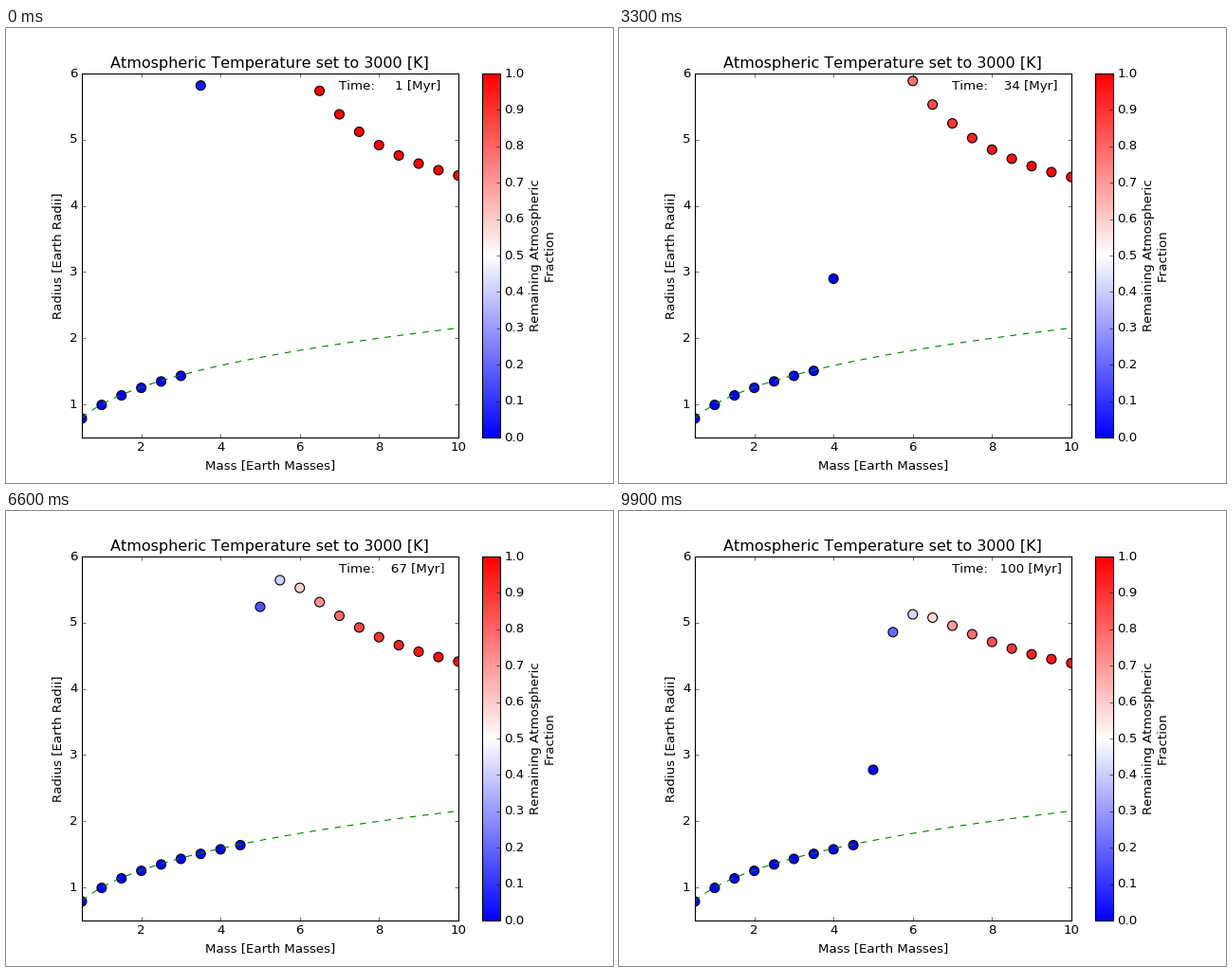
A matplotlib script for the animation above (10 s loop, 640x480 px).

```python
import math

import numpy as np
import matplotlib.pyplot as plt
from matplotlib.animation import FuncAnimation

plt.style.use("classic")
plt.rcParams.update({
    "font.family": "DejaVu Sans",
    "text.kerning_factor": 6,
    "figure.dpi": 80,
    "savefig.dpi": "figure",
    "figure.facecolor": "white",
})

FRAMES, INTERVAL = 100, 100

masses = np.arange(0.5, 10.01, 0.5)
core = 0.9925 * np.cbrt(masses)

# Depth of an untouched atmosphere: heavier planets hold it tighter
full = 0.874 + 9.742 / (masses - 3.269)

# Light planets have already lost part, or all, of it at the start
kept = np.array([math.erf(max(0, 0.089 + 0.75 * (m - 3.5))) for m in masses])
start = full * kept

# Time until the atmosphere is gone
life = 2.928 * (masses - 1.73) ** 3

# How steeply the remaining fraction follows the depth
power = np.minimum(3, 2.8 - 0.62 * (masses - 7))


def planet_state(age):
    """Radius and remaining atmospheric fraction of every planet."""
    left = np.clip(1 - (age - 1) / life, 0, 1)
    depth = start * np.sqrt(left)
    fraction = np.abs(depth / np.minimum(full, 12)) ** power
    return core + depth, fraction


fig, ax = plt.subplots(figsize=(8, 6), dpi=80)
radii, fractions = planet_state(1)
planets = ax.scatter(masses, radii, c=fractions, s=80, cmap="bwr",
                     vmin=0, vmax=1, edgecolors="black", linewidths=1)
curve = np.linspace(0.5, 10, 200)
ax.plot(curve, np.cbrt(curve), "--", color=(0, 0.5, 0), lw=1)
clock = ax.text(7, 5.75, "")

ax.set_xlim(0.5, 10)
ax.set_ylim(0.5, 6)
ax.set_xticks(range(2, 11, 2))
ax.set_yticks(range(1, 7))
ax.set_xlabel("Mass [Earth Masses]")
ax.set_ylabel("Radius [Earth Radii]")
ax.set_title("Atmospheric Temperature set to 3000 [K]")

bar = fig.colorbar(planets, ax=ax, ticks=np.linspace(0, 1, 11), format="%.1f")
bar.set_label("Remaining Atmospheric\nFraction", multialignment="center")


def draw(i):
    age = i + 1
    radii, fractions = planet_state(age)
    planets.set_offsets(np.column_stack([masses, radii]))
    planets.set_array(fractions)
    clock.set_text(f"Time: {age:5d} [Myr]")
    return planets, clock


anim = FuncAnimation(fig, draw, frames=FRAMES, interval=INTERVAL,
                     repeat=True, repeat_delay=0)
plt.show()
```
